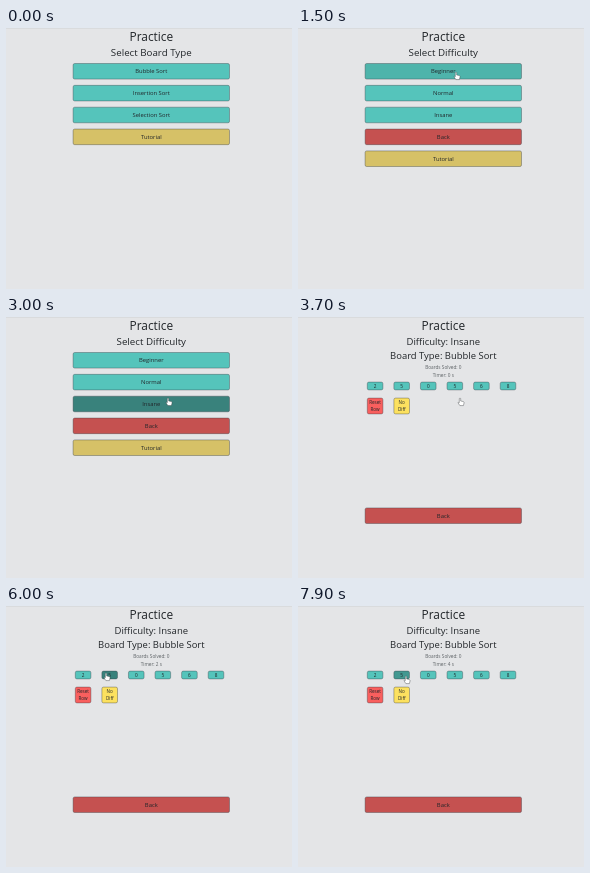
Recreate the animation shown at these times as an HTML page. Size 286 by 261 pixels, loop 8000 ms.

```html
<!DOCTYPE html>
<html lang="en">
<head>
<meta charset="utf-8">
<title>Sorting practice</title>
<style>
  html, body { margin: 0; width: 100%; height: 100%; overflow: hidden; background: #e4e5e7; }
  svg { display: block; width: 286px; height: 261px; }
  text { font-family: "Open Sans", "Noto Sans", sans-serif; text-anchor: middle; fill: #212529; }
  .head { font-weight: 500; }
  .note { fill: #5b6064; }
</style>
</head>
<body>
<svg id="stage" viewBox="0 0 286 261" xmlns="http://www.w3.org/2000/svg"></svg>
<script>
const NS = "http://www.w3.org/2000/svg";
const LOOP = 8000, FADE = 240, SAMPLES = 24;
const MID = 145.3;
const stage = document.getElementById("stage");

// Resting and hovered fills
const TEAL = [[85, 196, 187], [57, 130, 124]];
const RED = [[197, 81, 80], [150, 58, 58]];
const GOLD = [[214, 193, 103], [166, 148, 74]];
const CORAL = [[249, 95, 94], [190, 70, 70]];
const LEMON = [[252, 225, 95], [196, 173, 70]];

function add(parent, tag, attrs, content) {
  const el = document.createElementNS(NS, tag);
  for (const key in attrs) el.setAttribute(key, attrs[key]);
  if (content !== undefined) el.textContent = content;
  parent.appendChild(el);
  return el;
}

function label(parent, content, x, y, size, cls = "") {
  return add(parent, "text", { x, y, "font-size": size, class: cls }, content);
}

const buttons = [];

function button(scene, lines, cx, cy, w, h, colors, size) {
  const x = cx - w / 2, y = cy - h / 2;
  const rect = add(scenes[scene], "rect", {
    x, y, width: w, height: h, rx: 1.6,
    stroke: "#343a40", "stroke-opacity": 0.75, "stroke-width": 0.5
  });
  lines.forEach((line, i) => {
    const shift = (i - (lines.length - 1) / 2) * 7.2;
    label(scenes[scene], line, cx, cy + shift + size * 0.36, size);
  });
  buttons.push({ scene, rect, x, y, w, h, colors });
}

function wide(scene, name, cy, colors) {
  button(scene, [name], MID, cy, 156.4, 15.6, colors, 5.85);
}

add(stage, "rect", { width: 286, height: 261, fill: "#e4e5e7" });
add(stage, "rect", { width: 286, height: 0.6, fill: "#d3d5d7" });
label(stage, "Practice", MID, 12.7, 11.9, "head");
const scenes = [0, 1, 2].map(() => add(stage, "g", {}));

function menu(scene, title, items) {
  label(scenes[scene], title, MID, 27.6, 9.75, "head");
  items.forEach(([name, colors], i) => wide(scene, name, 43.3 + i * 21.85, colors));
}

menu(0, "Select Board Type", [
  ["Bubble Sort", TEAL], ["Insertion Sort", TEAL], ["Selection Sort", TEAL], ["Tutorial", GOLD]
]);
menu(1, "Select Difficulty", [
  ["Beginner", TEAL], ["Normal", TEAL], ["Insane", TEAL], ["Back", RED], ["Tutorial", GOLD]
]);

label(scenes[2], "Difficulty: Insane", MID, 27.6, 9.5, "head");
label(scenes[2], "Board Type: Bubble Sort", MID, 42, 9.45, "head");
label(scenes[2], "Boards Solved: 0", MID, 52.3, 4.7, "note");
const timer = label(scenes[2], "", MID, 59.8, 4.7, "note");
[2, 5, 0, 5, 6, 8].forEach((n, i) =>
  button(2, [n], 77.1 + i * 26.58, 69, 15.6, 7.8, TEAL, 4.7));
button(2, ["Reset", "Row"], 77.1, 89, 15.6, 15.8, CORAL, 4.6);
button(2, ["No", "Diff"], 103.7, 89, 15.6, 15.8, LEMON, 4.6);
wide(2, "Back", 198.7, RED);

const hand = add(stage, "path", {
  d: "M-.7 .5Q0-.5 .7 .5V3L3.4 3.6Q4.2 3.9 4.1 4.8L3.4 7.6H-.1L-2 4.8Q-2 3.9-.7 4.7Z",
  fill: "#fff", stroke: "#33383c", "stroke-width": 0.4, "stroke-linejoin": "round"
});

// Pointer stops: time, x, y
const path = [
  [100, 164, 105], [750, 158, 44], [2100, 158, 44], [2300, 157, 58],
  [2850, 162, 81], [3750, 162, 81], [4450, 100, 67], [6050, 100, 67],
  [6600, 157, 69], [6900, 157, 69], [7900, 108, 70]
];

function pointer(t) {
  if (t < path[0][0]) return [-20, -20];
  for (let i = 1; i < path.length; i++) {
    const [t0, x0, y0] = path[i - 1], [t1, x1, y1] = path[i];
    if (t < t1) {
      const u = (t - t0) / (t1 - t0), s = u * u * (3 - 2 * u);
      return [x0 + (x1 - x0) * s, y0 + (y1 - y0) * s];
    }
  }
  return path[path.length - 1].slice(1);
}

const sceneAt = t => t < 1440 ? 0 : t < 3500 ? 1 : 2;

// Share of the recent past the pointer spent on the button
function hover(b, t) {
  let hits = 0;
  for (let i = 0; i < SAMPLES; i++) {
    const past = t - (i + 0.5) * FADE / SAMPLES;
    const [x, y] = pointer(past);
    if (sceneAt(past) === b.scene && x > b.x && x < b.x + b.w && y > b.y && y < b.y + b.h) hits++;
  }
  return hits / SAMPLES;
}

function draw(t) {
  const now = sceneAt(t);
  scenes.forEach((g, i) => g.setAttribute("display", i === now ? "inline" : "none"));
  for (const b of buttons) {
    if (b.scene !== now) continue;
    const k = hover(b, t), [rest, dark] = b.colors;
    b.rect.setAttribute("fill", `rgb(${rest.map((c, i) => Math.round(c + (dark[i] - c) * k))})`);
  }
  timer.textContent = `Timer: ${Math.max(0, Math.floor((t - 3500) / 1000))} s`;
  hand.setAttribute("transform", `translate(${pointer(t)})`);
}

const start = performance.now();
function tick() {
  draw((performance.now() - start) % LOOP);
  requestAnimationFrame(tick);
}
draw(0);
requestAnimationFrame(tick);
</script>
</body>
</html>
```
